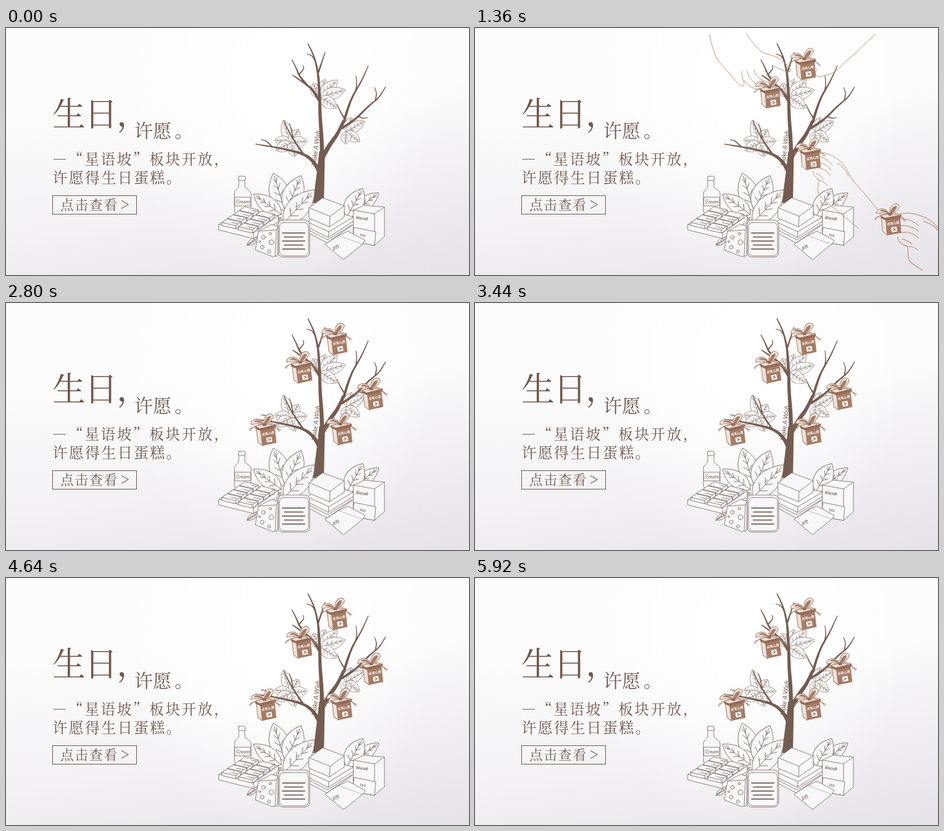
Recreate the animation shown at these times as an HTML page. Size 750 by 400 pixels, loop 6 s.

```html
<!DOCTYPE html>
<html lang="zh-CN">
<head>
<meta charset="utf-8">
<title>生日，许愿</title>
<style>
  html, body { margin: 0; width: 100%; height: 100%; overflow: hidden; }
  body {
    background:
      radial-gradient(ellipse 260px 330px at 440px 90px, #fff 20%, #fff0),
      linear-gradient(160deg, #fff0 50%, #dcd7e08c 105%),
      linear-gradient(#fcfcfc 30%, #f1eff2);
  }
  svg { display: block; width: 750px; height: 400px; }
  .copy { fill: #70584c; font-family: "Noto Serif CJK SC", "Noto Sans CJK SC", "Noto Sans CJK", serif; font-weight: 300; }
  .line { fill: none; stroke: #84716a; stroke-width: .9; stroke-linejoin: round; stroke-linecap: round; }
  .paper { fill: #f8f7f9; }
  .wood { fill: #745c50; }
  #tree .line { stroke: #a3938a; }
  .hand, .ribbon { fill: none; stroke: #c09478; stroke-width: 1; stroke-linecap: round; }
  .ribbon { fill: #eee3dd; stroke: #a67c66; }
  .tail { fill: none; }
  .tiny { fill: #70584c; stroke: none; font-family: Lato, sans-serif; font-style: italic; }
</style>
</head>
<body>
<svg viewBox="0 0 750 400">
  <defs>
    <clipPath id="window"><rect y="10" width="750" height="382"/></clipPath>

    <g id="gift">
      <path class="ribbon" d="M-15-12-8-9-6 18-13 12Z"/>
      <path fill="#a67c66" d="M-8-9 15-13 17 14-6 18Z"/>
      <path class="ribbon" d="M-17-14 5-19 17-15-9-10Z"/>
      <path fill="#946b57" d="M-17-14-9-10 17-15 17-11-8-6-16-10Z"/>
      <path class="ribbon" d="M-2-16C-9-31-25-25-23-17-16-19-8-18-2-16ZM-2-16C-3-35 13-37 14-28 10-21 4-17-2-16Z"/>
      <path fill="#a67c66" d="M-2-16C-8-25-16-25-18-21-12-21-7-19-2-16ZM-2-16C0-26 6-31 10-29 8-22 4-18-2-16Z"/>
      <path class="ribbon tail" d="M-2-16C-14-17-21-13-25-7M-18-13C-23-12-26-10-26-8M-2-16C10-19 17-10 25-6M12-14C18-11 21-7 23-4"/>
      <path fill="#946b57" d="M-5-18h6l1 4h-6Z"/>
      <text transform="translate(-6 2) rotate(-9)" fill="#fff" font-family="Noto Sans CJK SC, Noto Sans CJK, sans-serif" font-size="5.2" font-weight="700">点亮心愿</text>
      <g transform="translate(5.5 8.5) rotate(-8)">
        <rect x="-4.500" y="-4" width="9" height="8" rx="1" fill="#fff"/>
        <path d="M-2-2 2 0-2 2" fill="none" stroke="#946b57" stroke-width="1.2"/>
      </g>
    </g>

    <path id="handBelow" d="M124 104C112 84 90 58 70 36 62 26 60 13 49 4 38-5 27-11 14-10 8-9 9-5 15-4 24-2 31 4 36 11M12-3C4-2 5 4 13 5 22 7 29 11 34 18M9 7C5 11 9 15 16 15 24 17 29 22 32 27M44 7C54 13 59 20 62 28M5 19C3 25 9 31 14 34 16 40 10 47 13 55 20 66 29 73 39 80 51 90 64 101 78 112M14 34C20 36 24 38 27 43M10 23C15 26 19 29 21 33"/>
    <path id="handAbove" d="M-98-102C-96-88-92-76-87-64-80-52-68-42-56-27-50-18-42-14-42-23-45-30-46-36-46-42M-42-27C-36-20-28-13-20-13-15-15-20-20-26-24-32-29-36-35-37-42M-27-25C-20-20-12-16-7-18-4-22-12-25-17-30-21-34-25-38-26-44M-15-30C-8-24 2-23 8-27 8-31-2-35-8-42M-38-102C-28-88-20-76-9-71 2-68 12-66 20-58 28-52 35-47 33-42 25-40 14-46 5-51"/>
    <path id="handBeside" d="M116-58C98-44 86-28 74-19 60-8 54 2 46 6 38 10 30 12 22 13 16 12 14 6 20 0 26-5M25 2C18 5 11 5 11 1 15-5 24-8 30-13M15-5C8-5 7-10 13-13 23-18 34-18 42-24M13-13C8-15 4-18 0-18-5-19-3-24 4-27 15-31 21-38 31-44 36-48 40-52 43-58M4-27C1-31 3-36 9-40 17-44 20-50 25-58"/>
  </defs>

  <g class="copy">
    <text x="75" y="158.500" font-size="54" letter-spacing="-2">生日，</text>
    <text x="208 238 273" y="176.500" font-size="30">许愿。</text>
    <text x="75" y="220.500" font-size="23.500" letter-spacing="2.700">—“星语坡”板块开放，</text>
    <text x="75.500" y="251" font-size="24" letter-spacing="2.300">许愿得生日蛋糕。</text>
    <text x="88" y="294" font-size="21.5" letter-spacing="2">点击查看</text>
    <text x="185" y="295" font-size="26">&gt;</text>
    <rect x="75.5" y="271.5" width="136" height="30" fill="none" stroke="#70584c"/>
  </g>

  <g id="tree"></g>
  <text class="tiny" transform="translate(502 223) rotate(-83)" font-size="10.5">Make A Wish</text>
  <g id="foliage"></g>

  <g class="line paper">
    <path d="M377 246V256C377 261 370 262 370 268V296Q370 300 375 300H393Q397 300 397 296V268C397 262 387 261 387 256V246Z"/>
    <rect x="376.500" y="240" width="11" height="7" rx="2"/>
    <path d="M371 274H396V288H371Z"/>
    <text class="tiny" x="373" y="284" font-size="8">Cream</text>

    <path d="M345 318 384 292 441 304 441 313 401 341 345 327Z"/>
    <path d="M345 318 401 332 441 304M401 332V341"/>
    <g id="chocolate"></g>

    <path d="M404 359 409 329 430 318 441 321 440 369 432 370Z"/>
    <path d="M409 329 438 327 440 322M438 327 436 369"/>
    <circle cx="417" cy="339" r="3"/><circle cx="430" cy="347" r="4"/><circle cx="415" cy="355" r="3"/>
    <circle cx="426" cy="362" r="2.500"/><circle cx="428" cy="333" r="2"/><circle cx="411" cy="346" r="1.500"/>

    <path d="M488 314 517 294 563 306 563 318 520 348 488 331Z"/>
    <path d="M488 314 523 330 563 306M488 322 522 339 563 313M490 327 521 343 560 319M523 330 522 339"/>
    <path d="M491 291 513 275 548 288 548 306 524 322 491 308Z"/>
    <path d="M491 291 525 305 548 288M525 305 524 322"/>

    <path d="M447 311H484Q491 311 492 319V362Q492 371 483 371H449Q441 371 441 362V318Q442 312 447 311Z"/>
    <rect x="443" y="315" width="47" height="54" rx="7"/>
    <path d="M448 332H484M451 338.500H481M448 345H484M451 351.500H481M448 358H484" stroke-width="1.800"/>

    <path d="M563 295 580 287 613 290 613 338 597 352 563 346Z"/>
    <path d="M563 295 597 301 613 290M597 301V352"/>
    <path d="M564 323 599 330 597 352 562 346Z"/>
    <path d="M517 350 539 336 578 350 547 375Z"/>
    <path d="M539 336 554 329 582 344 578 350"/>
    <text class="tiny" transform="translate(567 309) rotate(8)" font-size="7" font-weight="700">biscuit</text>
    <text class="tiny" transform="translate(573 337) rotate(8)" font-size="7">tea</text>
    <text class="tiny" transform="translate(530 359) rotate(-18)" font-size="8">gift</text>
  </g>

  <g id="visitors" clip-path="url(#window)"></g>
</svg>

<script>
const byId = id => document.getElementById(id);
const add = (parent, markup) => parent.insertAdjacentHTML('beforeend', markup);
const pairs = text => text.split(' ').map(p => p.split(',').map(Number));

function leaf(parent, x, y, tipX, tipY, width) {
  const length = Math.hypot(tipX - x, tipY - y);
  const angle = Math.atan2(tipY - y, tipX - x) * 180 / Math.PI;
  let d = `M0 0C${length * .2} ${-width} ${length * .65} ${-width} ${length} 0` +
          `C${length * .65} ${width} ${length * .2} ${width} 0 0H${length * .92}`;
  for (const k of [.22, .4, .58, .74]) {
    const rise = width * .5 * (1.05 - k);
    d += `M${length * (k + .12)} ${-rise}L${length * k} 0L${length * (k + .12)} ${rise}`;
  }
  add(parent, `<path class="line paper" transform="translate(${x} ${y}) rotate(${angle})" d="${d}"/>`);
}

const cluster = (parent, x, y, width, tips) =>
  pairs(tips).forEach(([tx, ty]) => leaf(parent, x, y, tx, ty, width));

// Tapered limb along a Catmull-Rom curve.
function branch(startWidth, endWidth, text) {
  const p = pairs(text), curve = [], left = [], right = [], steps = 8;
  const at = i => p[Math.max(0, Math.min(p.length - 1, i))];
  for (let i = 0; i < p.length - 1; i++) {
    for (let s = 0; s < steps; s++) {
      const u = s / steps;
      curve.push([0, 1].map(c => {
        const [a, b, e, f] = [-1, 0, 1, 2].map(k => at(i + k)[c]);
        return b + .5 * u * (e - a + u * (2 * a - 5 * b + 4 * e - f + u * (3 * (b - e) + f - a)));
      }));
    }
  }
  curve.push(at(p.length));
  curve.forEach(([x, y], i) => {
    const a = curve[Math.max(0, i - 1)], b = curve[Math.min(curve.length - 1, i + 1)];
    const k = i / (curve.length - 1), size = Math.hypot(b[0] - a[0], b[1] - a[1]) || 1;
    const half = (startWidth + (endWidth - startWidth) * k) / 2 / size;
    const dx = (b[1] - a[1]) * half, dy = (b[0] - a[0]) * half;
    left.push([x + dx, y - dy]);
    right.unshift([x - dx, y + dy]);
  });
  add(byId('tree'), `<path class="wood" d="M${left.concat(right).join('L')}Z"/>`);
}

const tree = byId('tree'), foliage = byId('foliage');
cluster(tree, 509, 112, 13, '497,90 517,83 537,84 550,100 536,129');
cluster(tree, 461, 186, 12, '449,149 435,181 474,164 488,183 437,198 469,208');
cluster(tree, 551, 168, 11, '560,145 581,151 573,184 550,188');

branch(18, 9, '506,284 508,258 510,230 512,200');
branch(7, 4.5, '512,206 511,175 509,145 508,112');
branch(5, 1.5, '508,118 507,95 505,72 499,47 489,25');
branch(3, 1.2, '506,72 511,57 517,39');
branch(2, 1, '501,53 495,45 487,42');
branch(5, 1.5, '508,118 496,100 484,90 464,76');
branch(3.5, 1.2, '488,93 476,78 470,65 463,51');
branch(2, 1, '475,75 482,66 481,60');
branch(8, 4.5, '511,212 524,190 537,171 547,150');
branch(4.500, 1.2, '547,153 554,130 562,110 575,87 587,61');
branch(4, 1.2, '543,163 565,148 587,127 604,112 615,95');
branch(2.500, 1, '549,147 542,136 536,123');
branch(2.200, 1, '566,104 568,92 567,77');
branch(2, 1, '598,118 600,106 597,96');
branch(2, 1, '571,143 578,146 586,145');
branch(7, 1.3, '510,238 498,217 480,204 445,195 404,188');
branch(3, 1, '482,205 468,184 458,167 450,149');
branch(2, 1, '431,192 421,183 413,181');
branch(1.8, 1, '465,178 462,164 459,154');

leaf(foliage, 452, 296, 433, 235, 22);
leaf(foliage, 454, 296, 478, 239, 22);
leaf(foliage, 446, 302, 401, 269, 17);
leaf(foliage, 450, 316, 500, 262, 23);
leaf(foliage, 565, 297, 604, 267, 14);
leaf(foliage, 552, 306, 578, 260, 20);
leaf(foliage, 408, 340, 390, 352, 6);
leaf(foliage, 418, 326, 446, 307, 8);

for (let row = 0; row < 2; row++) {
  for (let col = 3; col >= 0; col--) {
    const x = 350 + row * 27 + col * 9.5, y = 315 + row * 7 - col * 6.5;
    add(byId('chocolate'), `<path class="line paper" d="M${x} ${y}l8-6 22 5v5l-8 6-22-5ZM${x} ${y}l22 5 8-6m-8 6v5"/>`);
  }
}

// Each hand carries a gift from one point to its branch; x, y are gift centres.
const visitors = [
  { art: 'handAbove',  from: [349, -14], to: [478, 112], start: 160,  end: 1360, fade: 1440 },
  { art: 'handBeside', from: [632, -34], to: [535, 66],  start: 160,  end: 1360, fade: 1440 },
  { art: 'handBelow',  from: [690, 401], to: [543, 212], start: 160,  end: 1360, fade: 1440 },
  { art: 'handAbove',  from: [393, 186], to: [420, 213], start: 1440, end: 1920, appear: 320 },
  { art: 'handBelow',  from: [731, 434], to: [593, 155], start: 960,  end: 1920, pose: 'rotate(-14) scale(1.2)' },
];
for (const v of visitors) {
  add(byId('visitors'), `<g><use class="hand" href="#${v.art}" transform="${v.pose || ''}"/><use href="#gift"/></g>`);
  v.group = byId('visitors').lastElementChild;
  [v.hand, v.gift] = v.group.children;
}

const LOOP = 6000, STEP = 80, HANDS_GONE = 2080, SWING = 620;
const clamp = x => Math.max(0, Math.min(1, x));

function draw(now) {
  const t = Math.floor(now % LOOP / STEP) * STEP;
  const swing = t > HANDS_GONE ? -3 * Math.sin((t - HANDS_GONE) / SWING * 2 * Math.PI) : 0;
  for (const v of visitors) {
    const k = clamp((t - v.start) / (v.end - v.start));
    const [x, y] = v.from.map((a, i) => a + (v.to[i] - a) * k);
    v.group.setAttribute('transform', `translate(${x} ${y})`);
    v.group.setAttribute('opacity', t < v.start ? 0 : v.appear ? clamp((t - v.start) / v.appear) : 1);
    v.hand.setAttribute('opacity', t >= HANDS_GONE ? 0 : v.fade ? 1 - clamp((t - v.fade) / 480) : 1);
    v.gift.setAttribute('transform', `rotate(${swing} 0 -14)`);
  }
  requestAnimationFrame(() => draw(performance.now()));
}
draw(performance.now());
</script>
</body>
</html>
```
